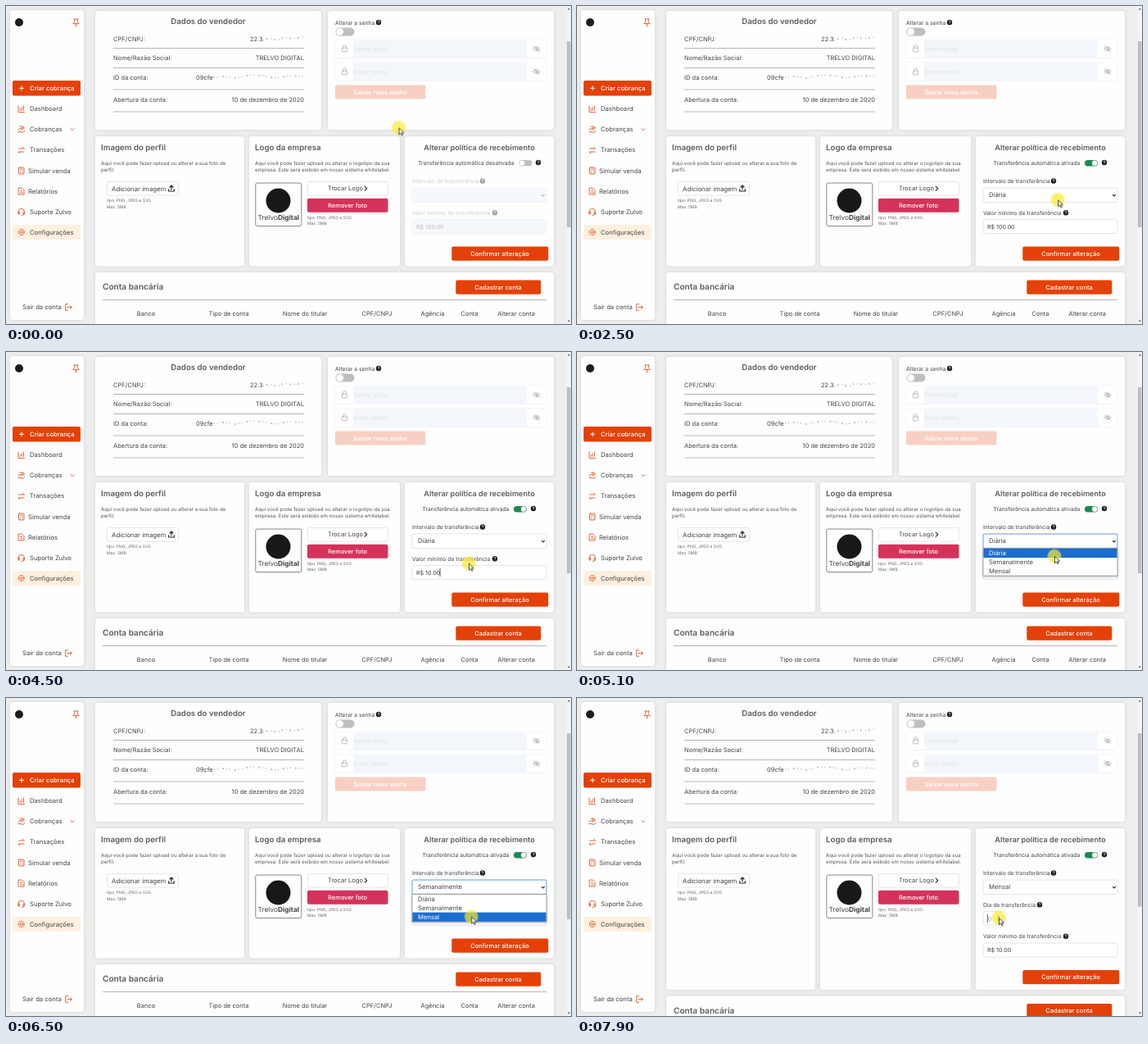
Recreate the animation shown at these times as an HTML page. Size 690 px wide and 388 px high, loop 8 s.

```html
<!DOCTYPE html>
<html lang="pt-BR">
<head>
<meta charset="utf-8">
<title>Configurações</title>
<style>
html, body { margin: 0; width: 100%; height: 100%; overflow: hidden; background: #eeeeef; }
svg { display: block; width: 690px; height: 388px; }
text { font: 7.5px Inter, "Open Sans", sans-serif; fill: #444; dominant-baseline: central; text-rendering: geometricPrecision; white-space: pre; }
.h { font-size: 9.7px; font-weight: 600; fill: #5c5c5c; }
.nav text { font-size: 7.7px; }
.lab text { font-size: 6.75px; }
.p text { font-size: 6.15px; fill: #555; }
.t text { font-size: 5px; fill: #666; }
.opt text { font-size: 7.7px; }
.money text { font-size: 7.1px; }
.mid { text-anchor: middle; }
.end { text-anchor: end; }
.w, .nav .w, .opt .w { fill: #fff; font-weight: 500; }
.opt .w { font-weight: 400; }
.card { fill: #fefefe; filter: drop-shadow(0 0 2px #0000001c); }
.btn { fill: #e34107; }
.line { fill: none; stroke: #999; stroke-width: .7; }
.box { fill: #fff; stroke: #dcdfe4; stroke-width: .8; }
.ic { fill: none; stroke: #d9501f; stroke-width: .85; stroke-linecap: round; stroke-linejoin: round; }
.dk { fill: none; stroke: #2a2a2a; stroke-width: 1.2; stroke-linecap: round; stroke-linejoin: round; }
.gr { fill: none; stroke: #a6a9ae; stroke-width: .75; stroke-linecap: round; }
.pill { fill: #bfbfbf; }
.knob { fill: #fff; stroke: #bbb; stroke-width: .5; }
.dim { opacity: .25; }

/* every state shares one 8 s clock */
.a { animation: 8s step-end infinite; }
.off { animation-name: off; }
.on { animation-name: on; }
.low { animation-name: low; }
.grow { animation-name: grow; }
.day { animation-name: day; }
.v1 { animation-name: v1; }
.v2 { animation-name: v2; }
.o1 { animation-name: o1; }
.o2 { animation-name: o2; }
.ring { animation-name: ring; }
.list { animation-name: list; }
.r1 { animation-name: r1; }
.r2 { animation-name: r2; }
.r3 { animation-name: r3; }
.caret { animation-name: caret; }
.dayfocus { animation-name: dayfocus; }
.arrow { animation-name: arrow; }
.hand { animation-name: hand; }
.beam { animation-name: beam; }
.ptr { animation: ptr 8s ease-in-out infinite; }

@keyframes off { 19.9%, to { opacity: 0; } }
@keyframes on { 0% { opacity: 0; } 19.9%, to { opacity: 1; } }
@keyframes low { 0% { transform: none; } 82.4%, to { transform: translateY(38.5px); } }
@keyframes grow { 82.4%, to { height: var(--h); } }
@keyframes day { 0% { opacity: 0; } 82.4%, to { opacity: 1; } }
@keyframes v1 { 51.1%, to { opacity: 0; } }
@keyframes v2 { 0% { opacity: 0; } 51.1%, to { opacity: 1; } }
@keyframes o1 { 69.9%, to { opacity: 0; } }
@keyframes o2 { 0% { opacity: 0; } 69.9% { opacity: 1; } 82.4%, to { opacity: 0; } }
@keyframes ring { 0% { opacity: 0; } 59.9% { opacity: 1; } 96.2%, to { opacity: 0; } }
@keyframes list { 0% { opacity: 0; } 59.9% { opacity: 1; } 69.9% { opacity: 0; } 77.4% { opacity: 1; } 82.4%, to { opacity: 0; } }
@keyframes r1 { 64.9%, to { opacity: 0; } }
@keyframes r2 { 0% { opacity: 0; } 64.9% { opacity: 1; } 80%, to { opacity: 0; } }
@keyframes r3 { 0% { opacity: 0; } 80%, to { opacity: 1; } }
@keyframes caret {
  0% { opacity: 0; }
  39.9% { opacity: 1; }
  47.4% { opacity: 0; }
  51.1% { opacity: 1; transform: translateX(-4.5px); }
  57.4%, to { opacity: 0; }
}
@keyframes dayfocus { 0% { opacity: 0; } 96.2%, to { opacity: 1; } }
@keyframes arrow { 0% { opacity: 1; } 14.4% { opacity: 0; } 26% { opacity: 1; } 36% { opacity: 0; } 56%, to { opacity: 1; } }
@keyframes hand { 0% { opacity: 0; } 14.4% { opacity: 1; } 26%, to { opacity: 0; } }
@keyframes beam { 0% { opacity: 0; } 36% { opacity: 1; } 56%, to { opacity: 0; } }
@keyframes ptr {
  0%, .5% { transform: translate(479.500px, 148.500px); }
  5%, 6.5% { transform: translate(517px, 160px); }
  15%, 21% { transform: translate(631px, 193px); }
  39.5%, 54.5% { transform: translate(557px, 266px); }
  59.7%, 61% { transform: translate(590px, 231px); }
  63.7% { transform: translate(583px, 249px); }
  67.4%, 69.9% { transform: translate(570px, 257px); }
  72.4%, 73.6% { transform: translate(611px, 250px); }
  76.5%, 77.4% { transform: translate(600px, 231px); }
  81.5%, 92% { transform: translate(568px, 267px); }
  96%, to { transform: translate(515px, 268px); }
}
</style>
</head>
<body>
<svg viewBox="0 0 690 388">
  <defs>
    <g id="q">
      <circle r="3.2" fill="#1c1c1c"/>
      <path d="M-1.1-.8C-1-2.3 1.3-2.1 1.1-.7 1 .1 0 0 0 .9M0 1.7v.3" fill="none" stroke="#fff" stroke-width=".75"/>
    </g>
    <g id="lock" class="gr"><rect x="-3.2" y="-.8" width="6.4" height="4.6" rx="1"/><path d="M-2-.8v-1.4a2 2 0 0 1 4 0v1.4"/></g>
    <g id="eye" class="gr"><path d="M-4.2 0Q0-5 4.2 0Q0 5-4.2 0M-3.6-3.4 3.6 3.4"/><circle r="1.3"/></g>
    <path id="down" class="dk" d="M-1.5-.7 0 .8 1.5-.7"/>
    <radialGradient id="halo">
      <stop offset=".8" stop-color="#f6ea30" stop-opacity=".7"/>
      <stop offset="1" stop-color="#f6ea30" stop-opacity=".15"/>
    </radialGradient>
  </defs>

  <!-- sidebar -->
  <rect class="card" x="5" y="5" width="90" height="378" rx="4"/>
  <circle cx="16" cy="20" r="5" fill="#1c1c1c"/>
  <path class="ic" d="M83 16h5M83.7 16v3.4l-1.9 2.2h7.4l-1.9-2.2V16M85.5 21.6V25"/>
  <rect class="btn" x="8" y="91" width="83" height="18.5" rx="2"/>
  <path d="M16 100.3h6M19 97.3v6" stroke="#fff"/>
  <rect x="8" y="267" width="83" height="18" rx="2" fill="#fdf0de"/>
  <g class="nav">
    <text class="w" x="29" y="100.3">Criar cobrança</text>
    <text x="29" y="125.500">Dashboard</text>
    <text x="29" y="150.500">Cobranças</text>
    <text x="29" y="175.800">Transações</text>
    <text x="27" y="201">Simular venda</text>
    <text x="27" y="226">Relatórios</text>
    <text x="29" y="251">Suporte Zulvo</text>
    <text x="29" y="276.200">Configurações</text>
    <text x="20" y="367.500">Sair da conta</text>
  </g>
  <g class="ic">
    <path d="M15 122v7.500h7.500M17.300 127.500v-2M19.300 127.500v-4M21.500 127.500v-5.500"/>
    <path d="M15 153.500h3l3 1 1.500-2M15 150.500l3-1 2 1.500M17 147h3"/><circle cx="20.500" cy="148.700" r="1.400"/>
    <path d="M79 149.700l2 2 2-2"/>
    <path d="M15.500 174h7l-2-1.800M22 178h-7l2 1.800"/>
    <rect x="15.500" y="197" width="6.500" height="8" rx="1"/><path d="M17.300 199.200h3M17.300 201.500h.2M20 201.500h.2M17.300 203.400h.2M20 203.400h.2"/>
    <path d="M15.500 222h4l2.500 2.500v5.500h-6.500zM17.500 225.500h2M17.500 227.800h2.800"/>
    <path d="M15 252v-1a3.700 3.700 0 0 1 7.400 0v1M15 251.500v2.500h1.400v-2.500zM21 251.500v2.500h1.400v-2.500M22 254q-.5 1.500-3 1.500"/>
    <circle cx="18.700" cy="276" r="1.300"/><circle cx="18.700" cy="276" r="3.500" stroke-dasharray="1.900 .849"/>
    <path d="M75.500 363.700h-2.800v7.600h2.800M75 367.500h5M78.300 365.500l2 2-2 2"/>
  </g>

  <!-- seller -->
  <rect class="card" x="109" y="6" width="276" height="145" rx="4"/>
  <text class="h mid" x="247" y="19.500">Dados do vendedor</text>
  <g>
    <text x="131" y="40.300">CPF/CNPJ:</text>
    <text x="131" y="63.500">Nome/Razão Social:</text>
    <text x="131" y="87">ID da conta:</text>
    <text x="131" y="114">Abertura da conta:</text>
    <text x="298" y="40.300">22.3</text>
    <text class="end" x="364" y="63.500">TRELVO DIGITAL</text>
    <text x="232" y="87">09cfe</text>
    <text class="end" x="364" y="114">10 de dezembro de 2020</text>
  </g>
  <path class="line" d="M131 51.500h233M131 75.500h233M131 102h233M131 129h233"/>
  <g fill="none" stroke="#666" opacity=".4" stroke-width="1.800">
    <path d="M314 42l8-3 9 3 9-4 10 2 13-2" stroke-dasharray="1 3 2 4"/>
    <path d="M254 87l12-1 14 2 18-4 16 1 14 3 18-3 17 1" stroke-dasharray="1 3 1 5 2 3"/>
  </g>

  <!-- password -->
  <rect class="card" x="393" y="6" width="276" height="145" rx="4"/>
  <g class="lab"><text x="402" y="20">Alterar a senha</text></g>
  <use href="#q" x="455" y="20"/>
  <rect class="pill" x="402.500" y="26.500" width="23" height="10" rx="5"/>
  <circle class="knob" cx="407.700" cy="31.500" r="4.600"/>
  <g fill="#fff" stroke="#f0f1f4" stroke-width=".7">
    <rect x="402" y="41" width="258" height="22.500" rx="2"/>
    <rect x="402" y="69" width="258" height="22.500" rx="2"/>
  </g>
  <path d="M424 41.400h212v21.700h-212zM424 69.400h212v21.700h-212z" fill="#f3f7fc"/>
  <use href="#lock" x="413.500" y="52"/><use href="#lock" x="413.500" y="80"/>
  <use href="#eye" x="648" y="52.300"/><use href="#eye" x="648" y="80"/>
  <g opacity=".1">
    <text x="424" y="52">Senha atual</text>
    <text x="424" y="80">Nova senha</text>
  </g>
  <rect x="402" y="96.500" width="110.500" height="17" rx="2" fill="#f7d0c3"/>
  <text class="w mid" x="457" y="105">Salvar nova senha</text>

  <!-- profile picture -->
  <rect class="card a grow" x="109" y="159" width="182" height="158.500" rx="4" style="--h:197px"/>
  <text class="h" x="116" y="173">Imagem do perfil</text>
  <g class="p">
    <text x="116" y="192.500">Aqui você pode fazer upload ou alterar a sua foto de</text>
    <text x="116" y="200">perfil.</text>
  </g>
  <rect class="box" x="123.500" y="214.500" width="87" height="16.500" rx="2"/>
  <text x="129" y="222.700" style="font-size:7.800px">Adicionar imagem</text>
  <path class="dk" d="M198.700 223.500v2.500h6.600v-2.500M202 224v-4.500M200 221l2-2 2 2" stroke-width="1.500"/>
  <g class="t">
    <text x="123" y="238">tipo: PNG, JPEG e SVG</text>
    <text x="123" y="245.700">Max: 5MB</text>
  </g>

  <!-- company logo -->
  <rect class="card a grow" x="297" y="159" width="184" height="158.500" rx="4" style="--h:197px"/>
  <text class="h" x="304" y="173">Logo da empresa</text>
  <g class="p">
    <text x="304" y="192.500">Aqui você pode fazer upload ou alterar o logotipo da sua</text>
    <text x="304" y="200">empresa. Este será exibido em nosso sistema whitelabel.</text>
  </g>
  <rect x="304.800" y="216" width="56" height="52.500" rx="2" fill="#fff" stroke="#555" stroke-width=".7"/>
  <circle cx="332.500" cy="237.500" r="15" fill="#181818"/>
  <text class="mid" x="332.800" y="258.500" style="font-size:8.400px">Trelvo<tspan font-weight="700">Digital</tspan></text>
  <rect class="box" x="368.400" y="214.500" width="98" height="16.500" rx="2"/>
  <text x="393" y="222.700">Trocar Logo</text>
  <path class="dk" d="M438.200 220.200l2.500 2.500-2.500 2.500" stroke-width="1.500"/>
  <rect x="368" y="234.800" width="98.500" height="17" rx="2" fill="#d5325b"/>
  <text class="w mid" x="417" y="243.200">Remover foto</text>
  <g class="t">
    <text x="368" y="258.500">tipo: PNG, JPEG e SVG</text>
    <text x="368" y="266">Max: 5MB</text>
  </g>

  <!-- bank account -->
  <g class="a low">
    <rect class="card" x="109" y="325" width="560" height="80" rx="4"/>
    <text class="h" x="118" y="343" style="font-size:10.100px">Conta bancária</text>
    <rect class="btn" x="549.300" y="334.500" width="104" height="17.300" rx="2"/>
    <text class="w mid" x="601" y="343">Cadastrar conta</text>
    <path class="line" d="M118 358.500h542"/>
    <g class="mid">
      <text x="171" y="375">Banco</text>
      <text x="272" y="375">Tipo de conta</text>
      <text x="365" y="375">Nome do titular</text>
      <text x="453" y="375">CPF/CNPJ</text>
      <text x="521" y="375">Agência</text>
      <text x="566" y="375">Conta</text>
      <text x="623" y="375">Alterar conta</text>
    </g>
  </g>

  <!-- payout policy -->
  <rect class="card a grow" x="487" y="159" width="182" height="158.500" rx="4" style="--h:197px"/>
  <text class="h mid" x="578" y="173" style="font-size:9.100px">Alterar política de recebimento</text>

  <g class="a off">
    <g class="lab"><text x="503" y="191">Transferência automática desativada</text></g>
    <rect class="pill" x="626.500" y="188" width="16" height="7.300" rx="3.650"/>
    <circle class="knob" cx="630.200" cy="191.650" r="3.300"/>
    <use href="#q" x="650" y="191"/>
    <g class="lab dim">
      <text x="496" y="213.500">Intervalo de transferência</text>
      <text x="496" y="252.200">Valor mínimo de transferência</text>
    </g>
    <g opacity=".4"><use href="#q" x="582" y="213.500"/><use href="#q" x="597" y="252.200"/></g>
    <g fill="#f5f8fc" stroke="#eff1f5" stroke-width=".7">
      <rect x="496" y="222" width="164" height="17.500" rx="2"/>
      <rect x="496" y="260.500" width="164" height="17" rx="2"/>
    </g>
    <use href="#down" x="656" y="231" opacity=".3"/>
    <g class="money" opacity=".33"><text x="501" y="269">R$ 100.00</text></g>
  </g>

  <g class="a on">
    <g class="lab">
      <text x="508.500" y="191">Transferência automática ativada</text>
      <text x="496" y="213.500">Intervalo de transferência</text>
    </g>
    <rect x="620" y="188" width="16" height="7.500" rx="3.750" fill="#1b8a50"/>
    <circle class="knob" cx="632.200" cy="191.750" r="3.200"/>
    <use href="#q" x="644" y="191"/>
    <use href="#q" x="582" y="213.500"/>

    <rect class="box" x="496" y="222" width="164" height="17.500" rx="2"/>
    <rect class="a ring" x="496" y="222" width="164" height="17.500" rx="2" fill="none" stroke="#a3bfe9" stroke-width="1.500"/>
    <g class="opt">
      <text class="a o1" x="503" y="230.800">Diária</text>
      <text class="a o2" x="503" y="230.800">Semanalmente</text>
      <text class="a day" x="503" y="230.800">Mensal</text>
    </g>
    <use href="#down" x="656" y="231"/>

    <g class="a day">
      <g class="lab"><text x="496" y="252.200">Dia de transferência</text></g>
      <use href="#q" x="565" y="252.200"/>
      <rect class="box" x="496" y="260.500" width="27" height="16.500" rx="2"/>
      <g class="money" opacity=".45"><text x="501.800" y="269">0</text></g>
      <g class="a dayfocus">
        <path d="M501.300 264v10" stroke="#333" stroke-width=".8"/>
        <path d="M512.500 267.500l2-2.500 2 2.500zM512.500 270l2 2.500 2-2.500z" fill="#666"/>
      </g>
    </g>

    <g class="a low">
      <g class="lab"><text x="496" y="252.200">Valor mínimo de transferência</text></g>
      <use href="#q" x="597" y="252.200"/>
      <rect class="box" x="496" y="260.500" width="164" height="17" rx="2"/>
      <g class="money">
        <text class="a v1" x="501" y="269">R$ 100.00</text>
        <text class="a v2" x="501" y="269">R$ 10.00</text>
      </g>
      <path class="a caret" d="M534.700 264v10" stroke="#222" stroke-width=".8"/>
    </g>
  </g>

  <g class="a low">
    <rect class="btn" x="544.300" y="293.500" width="118" height="17.300" rx="2"/>
    <text class="w mid" x="603" y="302">Confirmar alteração</text>
  </g>

  <g class="a list opt">
    <rect x="496" y="239.500" width="164" height="33.500" fill="#fff" stroke="#888" stroke-width=".7" style="filter:drop-shadow(0 1px 1.500px #0004)"/>
    <text x="503" y="245.200">Diária</text>
    <text x="503" y="256.300">Semanalmente</text>
    <text x="503" y="267.400">Mensal</text>
    <g fill="#1b6dd0">
      <g class="a r1"><rect x="496.400" y="239.800" width="163.200" height="11.200"/><text class="w" x="503" y="245.200">Diária</text></g>
      <g class="a r2"><rect x="496.400" y="250.700" width="163.200" height="11.200"/><text class="w" x="503" y="256.300">Semanalmente</text></g>
      <g class="a r3"><rect x="496.400" y="261.600" width="163.200" height="11.200"/><text class="w" x="503" y="267.400">Mensal</text></g>
    </g>
  </g>

  <!-- scrollbar -->
  <rect x="684.500" width="5.500" height="388" fill="#f4f4f5"/>
  <rect class="a grow" x="685" y="43" width="4.500" height="227" fill="#bebebf" style="--h:211.500px"/>
  <path d="M685.700 4.500l1.600-2.200 1.600 2.200zM685.700 383.500l1.600 2.200 1.600-2.200z" fill="#666"/>

  <!-- pointer -->
  <g class="ptr">
    <circle r="9" fill="url(#halo)"/>
    <path class="a arrow" d="M.5.3v8.200l2-1.800 1.300 2.900 1.300-.6-1.300-2.800h2.600z" fill="#fff" stroke="#222" stroke-width=".8"/>
    <path class="a hand" d="M1.300 1q1-1 1.700 0v3.200l3 .7q.8.300.7 1.200l-.7 3.400h-4l-2.300-3q.3-1 1.600 0z" fill="#fff" stroke="#222" stroke-width=".8"/>
    <path class="a beam" d="M5.800 3.500h4.400M8 3.500v9M5.800 12.500h4.400" fill="none" stroke="#222" stroke-width="1.100"/>
  </g>
</svg>
</body>
</html>
```
